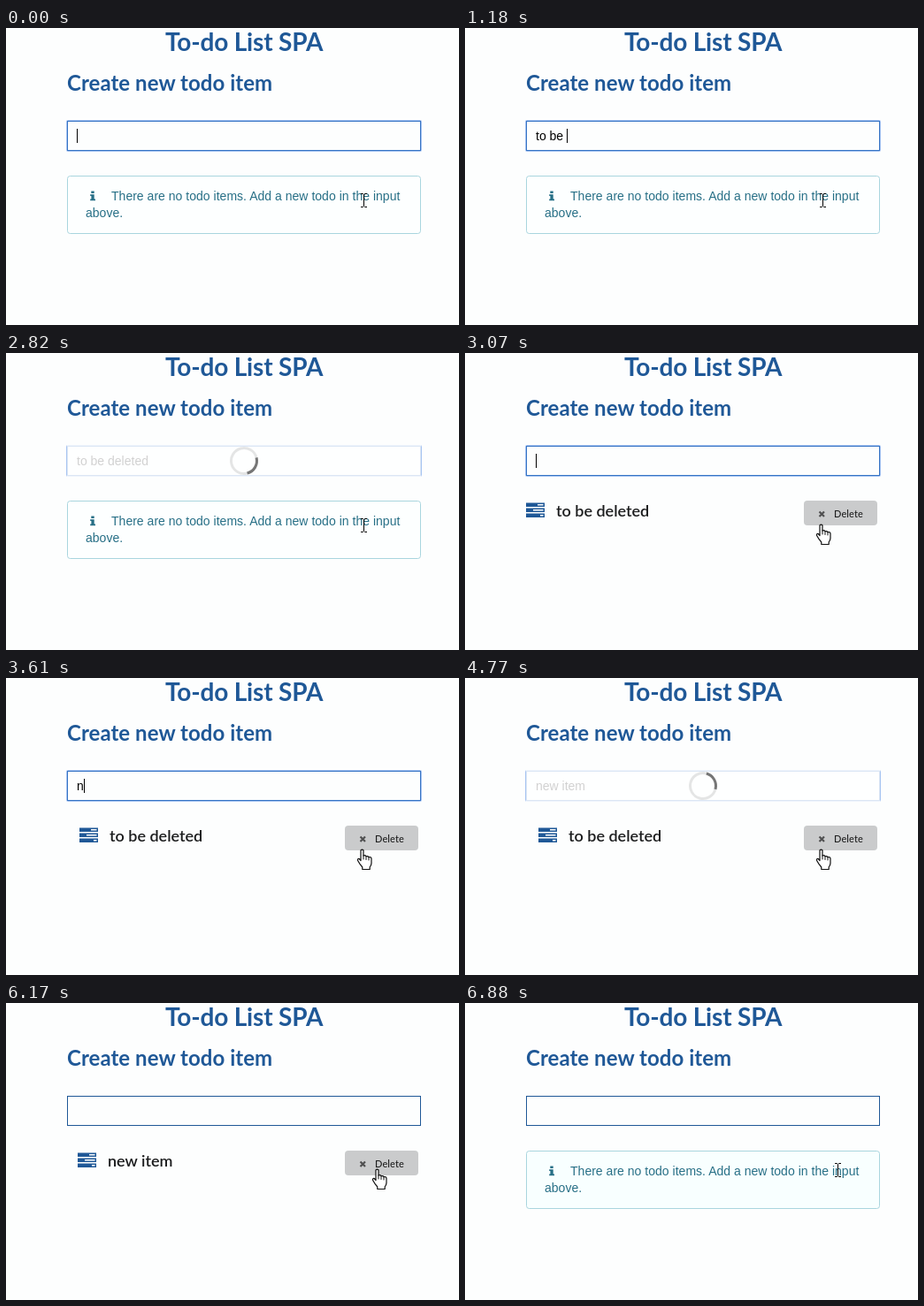
Recreate the animation shown at these times as an HTML page. Size 512x336 px, loop 8360 ms.

```html
<!DOCTYPE html>
<html lang="en">
<head>
<meta charset="utf-8">
<title>To-do List</title>
<style>
  html, body { margin: 0; height: 100%; overflow: hidden; background: #fdfefe; }
  svg { display: block; }
  text { white-space: pre; font: 14px "Liberation Sans", Arial, sans-serif; }
  .title, .item text { font-family: Lato, sans-serif; font-weight: 700; }
  .title { fill: #1f5897; font-size: 24px; letter-spacing: .05px; }
  .title.main { font-size: 28px; letter-spacing: -.17px; }
  .info text { fill: #276f86; letter-spacing: .02px; }
  .item .name { font-size: 18px; font-weight: 600; fill: #1b1c1d; }
  .item .label { font-size: 11px; font-weight: 500; letter-spacing: .1px; }
</style>
</head>
<body>
<svg width="512" height="336" viewBox="0 0 512 336">
  <defs>
    <g id="tasks" fill="#1f5897">
      <path d="M0 .5h21v4.500h-21z M0 6.500h21v4.500h-21z M0 12.500h21v4.500h-21z"/>
      <path d="M13 2h6.500v1.500h-6.500z M8 8h11.500v1.500h-11.500z M16 14h3.500v1.500h-3.500z" fill="#fff"/>
    </g>
  </defs>

  <text class="title main" x="180" y="26">To-do List SPA</text>
  <text class="title" x="69" y="71">Create new todo item</text>

  <rect id="ring" x="68.5" y="104.5" width="401" height="35" rx="1" fill="none" stroke="#a8c5f2"/>
  <rect id="field" x="69.5" y="105.5" width="399" height="33" fill="#fdfefe"/>
  <text id="value" x="80" y="127"></text>
  <rect id="caret" y="114" width="1" height="16"/>

  <g id="info" class="info">
    <rect id="panel" x="69.5" y="167.5" width="399" height="65" rx="3" stroke="#a9d5de"/>
    <path d="M96.3 184.5h3.4v2.6h-3.4z M95.2 188.2h4.5v5.2h1.3v1.8h-5.8v-1.8h1.2v-3.4h-1.2z" fill="#276f86"/>
    <text x="119" y="195">There are no todo items. Add a new todo in the input</text>
    <text x="90" y="214">above.</text>
  </g>

  <g id="items"></g>

  <g id="loader">
    <rect id="veil" x="69" width="400" fill="#fff" opacity=".82"/>
    <g id="spinner" fill="none" stroke-width="3">
      <circle r="14.5" stroke="#000" opacity=".1"/>
      <path d="M-10.25 -10.25A14.5 14.5 0 0 1 10.25 -10.25" stroke="#767676"/>
    </g>
  </g>

  <path id="beam" fill="none" stroke="#000"
    d="M-3 -7.5h2.5l1 1l1 -1h2.5 M.5 -6.5v13 M-3 7.5h2.5l1 -1l1 1h2.5"/>
  <g id="hand" stroke="#111" stroke-linejoin="round" stroke-linecap="round">
    <path fill="#fff" stroke-width="1.2" d="M-3 0q1.500 -1.800 3 0v6q2 -.8 3 .8q2 -.8 3 .8q2.700 -.4 3 1.800v5.200q-.2 2.500 -1.800 4.200v2.700h-8.400v-2.500q-2.800 -3 -5.200 -7.500q-.5 -2.400 1.600 -2l1.800 2z"/>
    <path fill="none" d="M0 6v4M3 7v3.500M6 8v3"/>
  </g>
</svg>

<script>
const LOOP = 8360;
const FIRST_ADDED = 2980, SECOND_ADDED = 4890, FIRST_GONE = 5930, SECOND_GONE = 6880, BLUR = 5830;
const phrases = [
  { text: 'to be deleted', until: FIRST_ADDED,
    keys: [270, 420, 630, 870, 1000, 1180, 1360, 1400, 1540, 1670, 1860, 1920, 1980] },
  { text: 'new item', until: SECOND_ADDED,
    keys: [3610, 3670, 3730, 3870, 4090, 4190, 4300, 4400] },
];
const loads = [
  { from: 2670, to: FIRST_ADDED, y: 104, h: 36 },
  { from: 4720, to: SECOND_ADDED, y: 104, h: 36 },
  { from: BLUR, to: FIRST_GONE, y: 164, h: 88 },
  { from: 6610, to: SECOND_GONE, y: 164, h: 36 },
];
const caretOn = [[0, 2490], [FIRST_ADDED, 4720], [SECOND_ADDED, 5450]];

const $ = id => document.getElementById(id);
const set = (el, attrs) => { for (const k in attrs) el.setAttribute(k, attrs[k]); };
const show = (el, on) => set(el, { visibility: on ? 'visible' : 'hidden' });
const within = (t, a, b) => t >= a && t < b;
const progress = (t, start, length) => Math.min(1, Math.max(0, (t - start) / length));

// CSS "ease": cubic-bezier(.25, .1, .25, 1)
function ease(x) {
  let lo = 0, hi = 1, s = x;
  for (let i = 0; i < 20; i++) {
    s = (lo + hi) / 2;
    if (.75 * s * (1 - s) + s ** 3 < x) lo = s; else hi = s;
  }
  return .3 * s * (1 - s) ** 2 + 3 * s * s * (1 - s) + s ** 3;
}

function makeItem(name) {
  const g = document.createElementNS('http://www.w3.org/2000/svg', 'g');
  g.setAttribute('class', 'item');
  g.innerHTML = `<g class="lead"><use href="#tasks" x="69" y="169"/>
    <text class="name" x="103" y="185">${name}</text></g>
    <rect x="383" y="167" width="83" height="28" rx="4"/>
    <path d="M400.5 179.5l5.5 5.5m0 -5.5l-5.5 5.5" stroke="#000" stroke-width="2.2" opacity=".6"/>
    <text class="label" x="417" y="186">Delete</text>`;
  $('items').append(g);
  return g;
}
const items = phrases.map(p => makeItem(p.text));

function drawItem(g, t, visible, row, hoverAt) {
  show(g, visible);
  const slide = 14 * ease(progress(t, hoverAt + 100, 250));
  const hover = ease(progress(t, hoverAt, 100));
  const tone = c => Math.round(c - 22 * hover);
  set(g, { transform: `translate(0 ${row * 54})` });
  set(g.querySelector('.lead'), { transform: `translate(${slide} 0)` });
  set(g.querySelector('rect'), { fill: `rgb(${tone(224)} ${tone(225)} ${tone(226)})` });
  set(g.querySelector('.label'), { opacity: .6 + .25 * hover });
}

function draw(t) {
  const focused = t < BLUR;
  show($('ring'), focused);
  set($('field'), { stroke: focused ? '#3573c4' : '#1f5897' });

  const phrase = phrases.find(p => within(t, p.keys[0], p.until));
  $('value').textContent = phrase ? phrase.text.slice(0, phrase.keys.filter(k => k <= t).length) : '';
  set($('caret'), { x: 80 + Math.round($('value').getComputedTextLength()) });
  show($('caret'), caretOn.some(([a, b]) => within(t, a, b)));

  show($('info'), !within(t, FIRST_ADDED, SECOND_GONE));
  set($('panel'), { fill: t < FIRST_ADDED ? '#fdffff' : '#f8ffff' });
  drawItem(items[0], t, within(t, FIRST_ADDED, FIRST_GONE), 0, FIRST_ADDED);
  drawItem(items[1], t, within(t, SECOND_ADDED, SECOND_GONE), t < FIRST_GONE ? 1 : 0, FIRST_GONE);

  const load = loads.find(l => within(t, l.from, l.to));
  show($('loader'), load);
  if (load) {
    set($('veil'), { y: load.y, height: load.h });
    const angle = (t - load.from + 50) * .6;
    set($('spinner'), { transform: `translate(269 ${load.y + load.h / 2}) rotate(${angle})` });
  }

  const move = ease(progress(t, 5450, 230));
  const beam = !within(t, FIRST_ADDED, SECOND_GONE);
  const at = { transform: `translate(${404 + 17 * move} ${195 - 6 * move})` };
  set($('beam'), at);
  set($('hand'), at);
  show($('beam'), beam);
  show($('hand'), !beam);
}

(function tick() {
  draw(performance.now() % LOOP);
  requestAnimationFrame(tick);
})();
</script>
</body>
</html>
```
